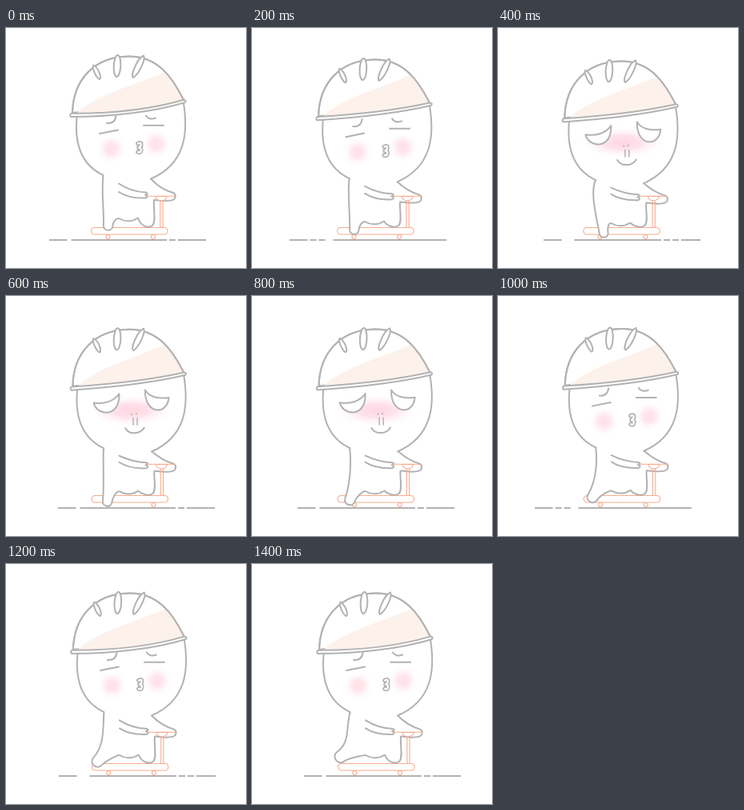
Animation, 300 px wide and 300 px high, one loop 1600 ms. Source, as an HTML page:

```html
<!DOCTYPE html>
<html lang="en">
<head>
<meta charset="utf-8">
<title>Scooter ride</title>
<style>
html, body { margin: 0; width: 100%; height: 100%; overflow: hidden; background: #fff; }
svg { display: block; width: 100vw; height: 100vh; }
.ink { stroke: #b2b2b2; stroke-width: 2; fill: #fff; stroke-linecap: round; stroke-linejoin: round; }
.line { fill: none; }
.orange { stroke: #f8ab8e; stroke-width: 1.1; fill: #fff; }
</style>
</head>
<body>
<svg viewBox="0 0 300 300">
  <defs>
    <radialGradient id="cheek">
      <stop offset="0" stop-color="#ffe0e8"/>
      <stop offset=".35" stop-color="#ffe6ed"/>
      <stop offset="1" stop-color="#fff" stop-opacity="0"/>
    </radialGradient>
    <radialGradient id="blush">
      <stop offset="0" stop-color="#ffd6e2"/>
      <stop offset=".4" stop-color="#ffe1ea"/>
      <stop offset="1" stop-color="#fff" stop-opacity="0"/>
    </radialGradient>
    <path id="lips" d="M165 144.5Q169 142.5 168.7 146Q168 149 166 149.5Q169.5 150 168.7 153.5Q168 156.5 165 155"/>
  </defs>

  <path id="ground" fill="none" stroke="#b2b2b2" stroke-width="2"/>

  <g id="rider">
    <g class="orange">
      <circle cx="127.3" cy="261" r="2.5"/>
      <circle cx="184" cy="261" r="2.5"/>
      <rect x="106.5" y="249.5" width="95.5" height="8.5" rx="4.2"/>
    </g>
    <path id="body" class="ink"/>
    <path id="farArm" class="ink"/>

    <g id="head" class="ink">
      <path stroke="none" d="M89 107C85 140 92 170 121.5 184L181 188.5C224 170 228 132 222 94Z"/>
      <path class="line" d="M89 107C85 140 92 170 121.5 184M181 188.5C224 170 228 132 222 94"/>

      <g id="whistle" class="line">
        <circle cx="131.5" cy="151" r="20" fill="url(#cheek)" stroke="none"/>
        <circle cx="188" cy="145" r="20" fill="url(#cheek)" stroke="none"/>
        <path d="M117 132L140 127.5M172 121.8H197M126 119Q136 120 137.5 110M175 109.5Q179 115.5 187 112.5"/>
        <use href="#lips" stroke-width="5.6"/>
        <use href="#lips" stroke="#fff" stroke-width="2.2"/>
      </g>

      <g id="smile">
        <ellipse cx="155" cy="137" rx="56" ry="21" fill="url(#blush)" stroke="none"/>
        <path d="M109 127C121 129 134 126 141 116C142 146 113 144 109 127Z"/>
        <path d="M173.5 111.5C178 120 190 123 203 121C201 144 172 142 173.5 111.5Z"/>
        <path class="line" stroke-width="1.5" d="M158.3 146.5V155M163.3 146.5V155"/>
        <path class="line" d="M156.7 141.5v.2M162.3 141v.2M148.5 159C153 167.5 167 167 172 158.5"/>
      </g>

      <path d="M83 106C84 65 110 36 153 35.5C190 35 208 62 222 90Z"/>
      <path fill="#fdf1ec" stroke="none" d="M88 106.500C115 82 160 72 199.500 54.500C209 65 216 78 221 90C190 101 120 107 88 106.500Z"/>
      <path class="line" d="M83 106C84 65 110 36 153 35.5C190 35 208 62 222 90"/>
      <path id="rim"/>
      <path d="M109.5 46.5C107 49 112 61 116.5 64C120 64 117 51 109.5 46.5Z"/>
      <ellipse cx="139" cy="47.5" rx="4.300" ry="13.500" transform="rotate(3 139 47.5)"/>
      <path d="M172 34.500C175 39 166 58 159 62C155 60 164 38 172 34.500Z"/>
    </g>

    <path id="nearArm" class="ink"/>
    <g class="orange">
      <path d="M187 210.5C188 217.5 200 217.5 201 210.5Z"/>
      <path fill="none" d="M174 210.3H211M192.8 216V249.5M196 216V249.5"/>
    </g>
  </g>
</svg>
<script>
const STEP = 200, COUNT = 8, ROAD_LENGTH = 196;
const bob = [0, 4, 6, 6.2, 6, 5.4, 1, 1];
const roadLeft = [54, 47, 57, 65, 57, 46, 66, 65];

const $ = id => document.getElementById(id);
const set = (id, name, value) => $(id).setAttribute(name, value);
const at = points => points.map(p => p.join(" ")).join(" ");

// Dash lengths: a short lead, one wide gap, and a few specks at either end
function road(specks, gap, early) {
  const dashes = early ? [22.5] : [22.5, gap, 124.5 - gap];
  for (let i = 0; i < specks; i++) dashes.push(3, 8);
  return [...dashes, early ? gap : 3, ROAD_LENGTH].join(" ");
}
const roads = [road(1, 5), road(2, 10, true), road(2, 16), road(1, 5)];

// The foot drops to the ground, then pushes back along an arc
function leg(step, hip) {
  const back = Math.max(0, (step - 2) / 5);
  const swing = step < 2 ? .05 : 1.3 * back ** .85 - .2;
  const drop = Math.max(0, 10 - 5 * step);
  const x = 128.5 - 17 * swing, y = 257 - 13.5 * swing ** 2 - drop;
  const r = 5.7 + 1.5 * swing, angle = .85 * swing;
  const sin = Math.sin(angle), cos = Math.cos(angle);
  // A point `along` the leg and `side` ways from the middle of the foot
  const foot = (along, side) => [x - along * sin + side * cos, y + along * cos + side * sin];
  return "C" + at([
    [118 + 6 * Math.sin(Math.PI * swing), 207], foot(-20, -r), foot(0, -r),
    foot(1.33 * r, -r), foot(1.33 * r, r), foot(0, r),
    foot(-.8 * r, r), [137, hip], [141, hip]
  ]);
}

function draw(time) {
  const step = Math.floor(time / STEP) % COUNT;
  const d = bob[step], hand = d * .6, near = d * .45, hip = 238 + d;
  const smiling = step >= 2 && step <= 4;
  const sag = d > 2 ? 0 : 3;

  set("ground", "d", `M${roadLeft[step]} 265h${ROAD_LENGTH}`);
  set("ground", "stroke-dasharray", roads[step % roads.length]);

  set("rider", "transform", `translate(${step * .15} 0)`);
  set("head", "transform", `translate(0 ${d}) rotate(${-d * .06} 156 110)`);
  $("whistle").style.display = smiling ? "none" : "";
  $("smile").style.display = smiling ? "" : "none";
  set("rim", "d",
    `M82 106.7C130 ${104 + sag} 180 ${99 + sag} 222 89.7Q226 90 224 93` +
    `C185 ${102 + sag} 130 ${108 + sag} 81 111Q79 108 82 106.7Z`);

  set("body", "d",
    `M121.5 ${184 + d}${leg(step, hip)}` +
    `C148 ${hip + 4} 157 ${hip + 4.5} 165 ${hip - .5}` +
    `C168 247 177 251 183 247C188 242 184 228 185 ${215 + hand}`);
  set("farArm", "d",
    `M181 ${188.5 + d * .8}C188 ${196 + hand} 198 ${203 + hand} 209 ${206 + hand}` +
    `Q213 ${208 + hand} 211 ${213 + hand}Q208 ${218 + hand} 186 ${215 + hand}`);
  set("nearArm", "d",
    `M141 ${194.5 + d * .85}C152 ${202 + near} 163 ${205 + near} 175 ${205.5 + near}` +
    `Q179 ${207 + near} 174 ${208.5 + near}Q179 ${210 + near} 175 ${212.5 + near}` +
    `C163 ${213 + near} 150 ${211 + near} 141 ${205 + near}`);
}

const start = performance.now();
function tick() {
  draw(performance.now() - start);
  requestAnimationFrame(tick);
}
tick();
</script>
</body>
</html>
```
